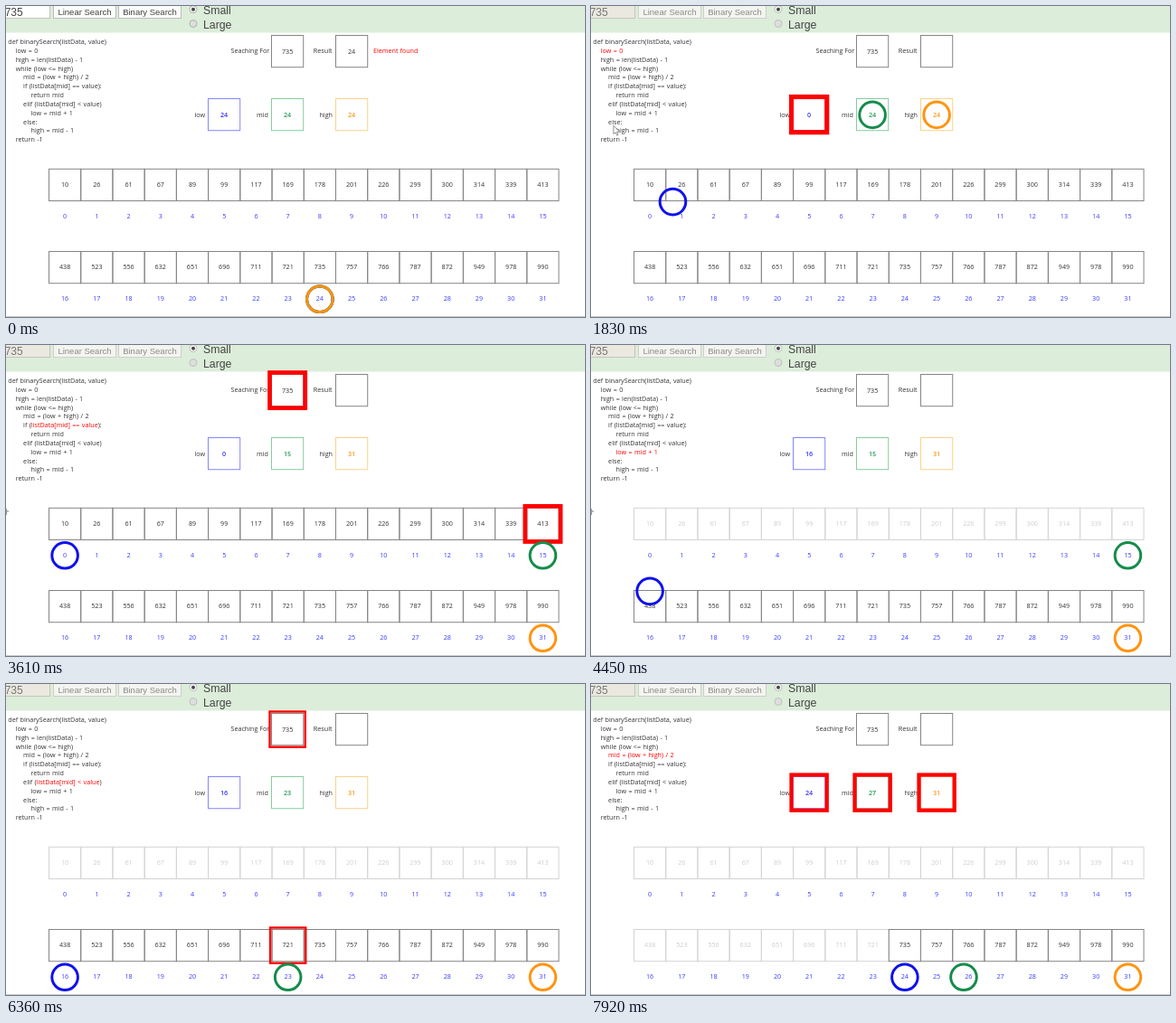
Recreate the animation shown at these times as an HTML page with a canvas. Size 640 by 344 pixels, loop 7.99 s.

```html
<!DOCTYPE html>
<html>
<head>
<meta charset="utf-8">
<title>Binary search</title>
<style>
html, body { margin: 0; width: 100%; height: 100%; overflow: hidden; background: #fff; }
canvas { display: block; }
</style>
</head>
<body>
<canvas id="stage" width="640" height="344"></canvas>
<script>
const ctx = document.getElementById('stage').getContext('2d');
const LOOP = 7990, CLICK = 1250, MOVE = 500;
const UI = '"Liberation Sans", Arial, sans-serif', TEXT = '"Open Sans", "Noto Sans", sans-serif';
const SIZE = 35.22, HALF = SIZE / 2, LEFT = 47.5;
const RED = '#f00', INK = '#333', EDGE = '#858585';

const data = [10, 26, 61, 67, 89, 99, 117, 169, 178, 201, 226, 299, 300, 314, 339, 413,
  438, 523, 556, 632, 651, 696, 711, 721, 735, 757, 766, 787, 872, 949, 978, 990];

// indent level, text
const code = [
  [0, 'def binarySearch(listData, value)'],
  [1, 'low = 0'],
  [1, 'high = len(listData) - 1'],
  [1, 'while (low <= high)'],
  [2, 'mid = (low + high) / 2'],
  [2, 'if (listData[mid] == value):'],
  [3, 'return mid'],
  [2, 'elif (listData[mid] < value)'],
  [3, 'low = mid + 1'],
  [2, 'else:'],
  [3, 'high = mid - 1'],
  [1, 'return -1']
];

const pointers = {
  low: { x: 223.5, ring: '#1010ee', edge: '#8585ff', ink: '#3030ff' },
  mid: { x: 293.5, ring: '#168c4b', edge: '#86cba0', ink: '#1f9a55' },
  high: { x: 364.5, ring: '#ff9411', edge: '#fbd28a', ink: '#f39a1c' }
};
const ALL = ['low', 'mid', 'high'];

// start time, code line, boxes to mark, pointer, new value
const steps = [
  [1403, 1, ['low'], 'low', 0],
  [1903, 2, ['high'], 'high', 31],
  [2390, 3, ['low', 'high']],
  [2830, 4, ALL, 'mid', 15],
  [3220, 5, ['value', 15]],
  [3725, 7, ['value', 15]],
  [4235, 8, [], 'low', 16],
  [4735, 3, ['low', 'high']],
  [5202, 4, ALL, 'mid', 23],
  [5702, 5, ['value', 23]],
  [6164, 7, ['value', 23]],
  [6630, 8, [], 'low', 24],
  [7110, 3, ['low', 'high']],
  [7565, 4, ALL, 'mid', 27]
];

// time, x, y of the mouse
const mouse = [[430, 8, 330], [950, 180, 40], [1150, 172, 6], [1280, 172, 6], [1830, 25, 132], [2100, -1, 184]];

const clamp = v => Math.max(0, Math.min(1, v));
const mix = (a, b, f) => a + (b - a) * f;
const cell = i => [LEFT + i % 16 * SIZE, i < 16 ? 180.3 : 271.5];
const indexSpot = i => [cell(i)[0] + HALF, i < 16 ? 232.8 : 324.3];
const home = name => [pointers[name].x + HALF, 120.4];

function text(s, x, y, color = INK, align = 'center', font = '7.2px ' + TEXT) {
  ctx.font = font;
  ctx.textAlign = align;
  ctx.textBaseline = 'alphabetic';
  ctx.fillStyle = color;
  ctx.fillText(s, x, y + parseFloat(font.match(/[\d.]+px/)) * 0.36);
  return ctx.measureText(s).width;
}

function box(x, y, w, h, color, width = 1) {
  ctx.strokeStyle = color;
  ctx.lineWidth = width;
  ctx.strokeRect(x, y, w, h);
}

function square(x, y, color) {
  box(x, y, SIZE, SIZE, color);
}

function fill(x, y, w, h, color) {
  ctx.fillStyle = color;
  ctx.fillRect(x, y, w, h);
}

function ring(x, y, r, color, width) {
  ctx.beginPath();
  ctx.arc(x, y, r, 0, 7);
  ctx.strokeStyle = color;
  ctx.lineWidth = width;
  ctx.stroke();
}

function button(x, label, off) {
  fill(x, -3, 70, 17, off ? '#f4f4f0' : '#fcfcfa');
  box(x + .5, -3.5, 69, 17, off ? '#d0d0cc' : '#bdbdbd');
  text(label, x + 35, 7, off ? '#8a8a8a' : '#444', 'center', '9.5px ' + UI);
}

function radio(y, label, on, off) {
  ctx.beginPath();
  ctx.arc(207, y, 4, 0, 7);
  ctx.fillStyle = on ? '#f6f6f6' : '#dedede';
  ctx.fill();
  ring(207, y, 4, off ? '#bbb' : '#aaa', .9);
  if (on) {
    ctx.beginPath();
    ctx.arc(207, y, 2, 0, 7);
    ctx.fillStyle = '#444';
    ctx.fill();
  }
  text(label, 218, y + .7, '#444', 'left', '12.3px ' + UI);
}

function header(off) {
  fill(0, 0, 640, 29.5, '#dcedda');
  fill(-5, -3, 53, 17, off ? '#ebe9df' : '#fff');
  box(-5.5, -3.5, 54, 17, '#c4c4bc');
  text('735', -1.3, 6.6, off ? '#777' : '#444', 'left', '12px ' + UI);
  button(52, 'Linear Search', off);
  button(124, 'Binary Search', off);
  radio(3.7, 'Small', true, off);
  radio(19.5, 'Large', false, off);
}

function listing(active) {
  ctx.wordSpacing = '0.5px';
  code.forEach(([level, line], i) => {
    let x = 2.3 + level * 8.4;
    const y = 39.4 + i * 9.84;
    const on = i === active;
    const parts = on && line.match(/^((?:while|if|elif) \()(.*)(\):?)$/);
    if (!parts) return text(line, x, y, on ? RED : INK, 'left');
    parts.slice(1).forEach((s, k) => x += text(s, x, y, k === 1 ? RED : INK, 'left'));
  });
  ctx.wordSpacing = '0px';
}

function cells(dim) {
  data.forEach((value, i) => {
    const [x, y] = cell(i), faded = i < dim;
    square(x, y, faded ? '#d4d4d4' : EDGE);
    text(value, x + HALF, y + 17.4, faded ? '#cdcdcd' : INK);
    const [ix, iy] = indexSpot(i);
    text(i, ix, iy - .4, '#3c3cff');
  });
}

function mark(target, width) {
  const [x, y] = target === 'value' ? [293.5, 32.5]
    : target in pointers ? [pointers[target].x, 102.5] : cell(target);
  if (width > 0) box(x - 2, y - 2, SIZE + 4, SIZE + 4, RED, width);
}

function cursor(t) {
  const k = mouse.findIndex(m => m[0] > t);
  if (k === 0 || t > 5400) return;
  if (k < 0) {
    fill(-1, 183.5, 4, 1, '#777');
    fill(0, 181, 1, 7, '#999');
    return;
  }
  const [t0, x0, y0] = mouse[k - 1], [t1, x1, y1] = mouse[k];
  const f = (t - t0) / (t1 - t0);
  ctx.save();
  ctx.translate(mix(x0, x1, f), mix(y0, y1, f));
  const shape = new Path2D('M0 0V9.5L2.2 7.5 3.8 11 5.2 10.3 3.7 7H6.6Z');
  ctx.fillStyle = '#fff';
  ctx.fill(shape);
  ctx.strokeStyle = '#777';
  ctx.lineWidth = .8;
  ctx.stroke(shape);
  ctx.restore();
}

function draw(t) {
  const started = t >= CLICK;
  const vars = { low: 24, mid: 24, high: 24 }, spots = {};
  ALL.forEach(n => spots[n] = started ? home(n) : indexSpot(24));
  let current;
  for (const step of steps) {
    const [at, , , name, value] = step;
    if (at > t) break;
    current = step;
    if (!name) continue;
    const f = clamp((t - at) / MOVE), end = indexSpot(value);
    vars[name] = value;
    spots[name] = spots[name].map((v, i) => mix(v, end[i], f));
  }

  fill(0, 0, 640, 344, '#fff');
  header(started);
  fill(0, 343, 640, 1, '#ccc');
  listing(current && current[1]);

  text('Seaching For', 291.3, 49.7, INK, 'right');
  text('Result', 360.5, 49.7, INK, 'right');
  square(293.5, 32.5, EDGE);
  square(364.5, 32.5, EDGE);
  text('735', 311.1, 50);
  if (!started) {
    text('24', 382.1, 50);
    text('Element found', 406, 49.7, RED, 'left');
  }

  for (const n of ALL) {
    const p = pointers[n];
    text(n, p.x - 3.5, 120.6, INK, 'right');
    square(p.x, 102.5, p.edge);
    text(vars[n], p.x + HALF, 120, p.ink, 'center', '600 7.2px ' + TEXT);
  }

  cells(current ? vars.low : 0);
  if (current) {
    const width = 6 * clamp((t - current[0]) / MOVE);
    current[2].forEach(target => mark(target, width));
  }
  ALL.forEach(n => ring(...spots[n], 14.3, pointers[n].ring, 3));
  cursor(t);
}

function tick() {
  draw(performance.now() % LOOP);
  requestAnimationFrame(tick);
}
tick();
</script>
</body>
</html>
```
